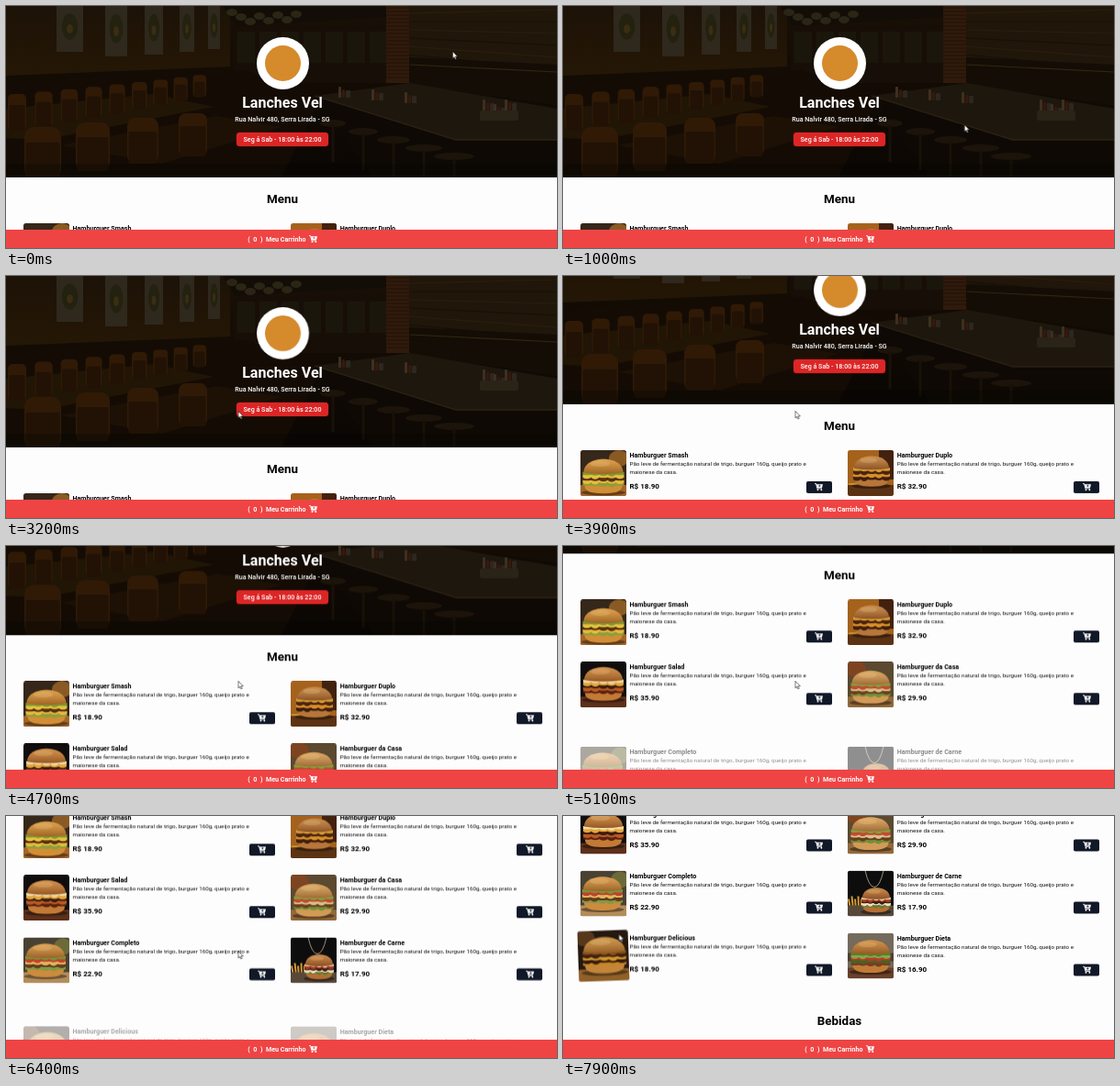
An HTML page for the animation above (8000 ms loop, 600 by 264 pixels).

```html
<!DOCTYPE html>
<html lang="pt-BR">
<head>
<meta charset="utf-8">
<title>Menu</title>
<style>
  * { margin: 0; box-sizing: border-box; }
  html, body { width: 100%; height: 100%; overflow: hidden; background: #fefdfe; }
  body { font-family: Roboto, sans-serif; font-size: 7.14px; line-height: 10.7px; color: #000; }
  #stage { position: relative; width: 600px; height: 264px; overflow: hidden; }
  #page, #logo, #cursor, .photo, .rise2, .rise3 { animation: 8s linear infinite; }
  #page { position: absolute; inset: 0; animation-name: scroll; }
  .mid { position: absolute; left: 0; width: 602px; text-align: center; }

  header { position: absolute; left: 0; top: 0; width: 600px; height: 187px; color: #fff; background: #0d0804; }
  header svg { position: absolute; left: 0; top: 0; }
  #logo { position: absolute; left: 272.7px; top: 33.5px; width: 57px; height: 57px; border-radius: 50%;
    background: #fff; animation-name: grow; }
  #logo::after { content: ""; position: absolute; inset: 9px; border-radius: 50%; background: #d58a2c; }
  h1 { top: 97.3px; font-size: 16.06px; line-height: 18px; }
  .address { top: 118.8px; font-weight: 500; }
  .hours { top: 138.3px; }
  .hours span { display: inline-block; height: 15.2px; padding: 0 7.1px; line-height: 15.2px;
    border-radius: 3.5px; background: #dc2626; box-shadow: 0 0 1.5px #a01616; font-weight: 500; }
  h2 { font-size: 13.4px; line-height: 16px; }

  .item { position: absolute; width: 274px; height: 50px; }
  .photo { position: absolute; left: 0; top: 0; width: 50px; height: 50px; border-radius: 2.7px; overflow: hidden; }
  .photo svg { display: block; width: 100%; height: 100%; }
  .item:nth-of-type(7) .photo { animation-name: tilt; }
  .info { position: absolute; left: 53.5px; top: .2px; width: 215px; }
  .info b { display: block; }
  .info p { width: 200px; font-size: 6.245px; line-height: 8.92px; color: #111; white-space: nowrap; }
  .price { position: absolute; left: 53.5px; top: 34.8px; font-size: 8.03px; font-weight: 700; }
  .add { position: absolute; left: 246px; top: 33.6px; width: 27.7px; height: 12.7px; border-radius: 1.8px;
    background: #111827; color: #fff; }
  .add svg { position: absolute; left: 9.4px; top: 2.2px; }
  .rise2 { animation-name: rise2; }
  .rise3 { animation-name: rise3; }

  footer { position: absolute; left: 0; top: 244px; width: 600px; height: 20px; background: #ef4444;
    color: #fff; font-weight: 700; white-space: pre; }
  footer > * { position: absolute; top: 6px; }
  #cursor { position: absolute; left: 0; top: 0; animation-name: point; }

  @keyframes scroll {
    0%, 44.4% { transform: translateY(0); }
    48.75% { transform: translateY(-47px); }
    52.5% { transform: translateY(-82px); }
    58.75% { transform: translateY(-89.5px); }
    61.25% { transform: translateY(-132px); }
    63.75% { transform: translateY(-178.7px); }
    68.75% { transform: translateY(-181px); }
    73.75% { transform: translateY(-195px); }
    78% { transform: translateY(-223px); }
    83% { transform: translateY(-267px); }
    88.1%, 100% { transform: translateY(-313.5px); }
  }
  @keyframes grow {
    0%, 22.4%, 30%, 100% { transform: scale(1); }
    25%, 27.5% { transform: scale(1.1); }
  }
  @keyframes tilt {
    0%, 90.6% { transform: none; animation-timing-function: ease; }
    94.4%, 100% { transform: scale(1.1) rotate(-2deg); }
  }
  @keyframes rise2 {
    0%, 62.4% { opacity: 0; transform: translateY(44.6px); animation-timing-function: ease; }
    67.4%, 100% { opacity: 1; transform: none; }
  }
  @keyframes rise3 {
    0%, 78.9% { opacity: 0; transform: translateY(44.6px); animation-timing-function: ease; }
    83.9%, 100% { opacity: 1; transform: none; }
  }
  @keyframes point {
    0% { transform: translate(486px, 49px); }
    5% { transform: translate(471px, 143px); }
    7.5%, 10% { transform: translate(470px, 143px); }
    21.25% { transform: translate(321px, 81px); }
    23.75% { transform: translate(315px, 74px); }
    26.25% { transform: translate(322px, 84px); }
    30.6% { transform: translate(420px, 144px); }
    32.5% { transform: translate(406px, 145px); }
    40%, 83.75% { transform: translate(252.5px, 147px); }
    88.75% { transform: translate(107px, 150px); }
    91.25% { transform: translate(66px, 160px); }
    95%, 98.6% { transform: translate(60px, 168px); }
    98.7%, 100% { transform: translate(60.5px, 128.5px); }
  }
</style>
</head>
<body>
<div id="stage">
  <main id="page">
    <header>
      <svg id="room" width="600" height="187"></svg>
      <div id="logo"></div>
      <h1 class="mid">Lanches Vel</h1>
      <p class="mid address">Rua Nalvir 480, Serra Lirada - SG</p>
      <p class="mid hours"><span>Seg á Sab - 18:00 às 22:00</span></p>
    </header>
    <h2 class="mid" style="top:203px">Menu</h2>
    <section id="items"></section>
    <h2 class="mid" style="top:528.5px">Bebidas</h2>
  </main>
  <footer><span style="left:263.3px">(  0  )</span><span style="left:283px">Meu Carrinho</span><span id="cart" style="left:330.4px"></span></footer>
  <svg id="cursor" width="8" height="11" viewBox="0 0 8 11">
    <path d="M.4 .4V7.9L2.1 6.4 3.3 9 4.5 8.5 3.4 5.9H5.8Z" fill="#fff" stroke="#111" stroke-width=".6"/>
  </svg>
</div>
<script>
const $ = id => document.getElementById(id);
const rect = (x, y, w, h, fill, r = 0) => `<rect x="${x}" y="${y}" width="${w}" height="${h}" rx="${r}" fill="${fill}"/>`;
const shape = (d, fill) => `<path d="${d}" fill="${fill}"/>`;
const line = (d, color, width = 1) => `<path d="${d}" fill="none" stroke="${color}" stroke-width="${width}"/>`;
const oval = (x, y, rx, ry, fill) => `<ellipse cx="${x}" cy="${y}" rx="${rx}" ry="${ry}" fill="${fill}"/>`;
const repeat = (n, f) => Array.from({ length: n }, (_, i) => f(i)).join("");
const fade = (id, a, b) => `<linearGradient id="${id}" x2="0" y2="1"><stop stop-color="${a}"/><stop offset="1" stop-color="${b}"/></linearGradient>`;

const cart = plus => `<svg width="9.2" height="8.4" viewBox="0 0 18 16" style="display:block">
  <path d="M0 1H3.1L5.6 11.2H15.6" fill="none" stroke="#fff" stroke-width="1.8"/>
  <path d="M3.6 2H17.6L15.8 9.4H5.4Z" fill="#fff"/>
  <circle cx="6.8" cy="14" r="1.8" fill="#fff"/><circle cx="14.4" cy="14" r="1.8" fill="#fff"/>
  <path d="M10.5 3.3V8M8.1 5.7H12.9" stroke="${plus}" stroke-width="1.4"/></svg>`;

// Dim dining room behind the header
function room() {
  const posters = [[55, 29, 50], [108, 24, 55], [151, 20, 53], [189, 16, 50], [220, 13, 47]];
  const chair = (x, y, w, h) => rect(x, y, w, h, "#301a06", w / 4) + rect(x + 1.5, y + h * .3, w - 3, h * .7, "#211205", 2);
  const bottle = (x, y) => rect(x, y, 3, 12, "#3c3022", 1) + rect(x + 4, y + 3, 3, 9, "#3a170b", 1) + rect(x + 8, y + 4, 5, 8, "#2c2720", 1);
  return `<defs>${fade("base", "#191006", "#0a0603")}${fade("wall", "#1c1207", "#251705")}${fade("crust", "rgba(255,220,150,.25)", "rgba(60,20,0,.35)")}</defs>` +
    rect(0, 0, 600, 188, "url(#base)") +
    shape("M0 0H244V66L0 76Z", "url(#wall)") +
    posters.map(([x, w, h]) => rect(x, -4, w, h + 4, "#2f281c") + oval(x + w / 2, h * .45, w * .3, h * .28, "#23210f") +
      oval(x + w / 2, h * .5, w * .12, h * .1, "#3b2d12")).join("") +
    shape("M236 0H416V12L250 22Z", "#130d07") +
    rect(248, 22, 168, 62, "#170f07") +
    repeat(7, i => rect(252 + i * 24, 28, 19, 34, "#1b160b")) +
    repeat(8, i => oval(246 + i * 10, 7 + i * 5 % 11, 6, 4, "#2b2516")) +
    shape("M438 0H600V108L438 84Z", "#20160a") +
    repeat(8, i => line(`M438 ${8 + i * 9}L600 ${4 + i * 13}`, i % 2 ? "#181006" : "#2a1e0e", 1.2)) +
    shape("M438 56L600 64V108L438 84Z", "#130d06") +
    rect(414, 0, 25, 84, "#301a0b") +
    repeat(20, i => line(`M414 ${i * 4 + 2}h25`, "#201008", 1)) +
    line("M440 64L600 72", "#33270f", 1.2) +
    shape("M0 84L260 70L345 96L300 187H0Z", "#140c04") +
    shape("M0 112L160 96L226 110L40 146L0 144Z", "#211505") +
    shape("M60 152L230 120L300 132L170 172Z", "#1d1105") +
    repeat(9, i => chair(2 + i * (30 - i * .6), 96 - i * 2.6, 20 - i * .7, 40 - i * 2)) +
    repeat(4, i => chair(20 + i * 56, 132 - i * 5, 40 - i * 3, 56 - i * 3)) +
    shape("M336 98L440 84L600 112V146L490 146Z", "#1e170d") +
    shape("M336 98L490 146L600 146V187H400Z", "#0e0904") +
    line("M336 98L490 146H600", "#2e2315", 1.3) +
    repeat(5, i => oval(356 + i * 33, 128 + i * 9, 14 + i * 2, 4, "#1c140a") +
      line(`M${356 + i * 33} ${130 + i * 9}v40`, "#191107", 3)) +
    repeat(3, i => bottle(362 + i * 36, 88 + i * 3)) +
    repeat(3, i => bottle(519 + i * 12, 102 + i % 2 * 5)) + rect(516, 114, 42, 11, "#2a2318", 2) +
    rect(0, 172, 600, 16, "rgba(0,0,0,.25)");
}

// [name, price, backdrop, board, bun, layers, x, y, width, extra behind]
const menu = [
  ["Smash", "18.90", "#35271a", "#a4652b", "#d28e36", ["#7c9a35", "#e6c23c", "#5a2d14", "#e8bd3a", "#8c9f3c"], 25, 9, 43, oval(42, 9, 11, 9, "#8a5a24")],
  ["Duplo", "32.90", "#a5621d", "#5b3314", "#b8763a", ["#d69a32", "#4a2411", "#d88f28", "#3d1d0e"], 26, 6, 38, rect(34, 0, 16, 32, "#42220e") + rect(0, 36, 15, 8, "#cf922d", 3)],
  ["Salad", "35.90", "#100d0c", "#5d301b", "#c47a36", ["#f0d9a4", "#e2a53a", "#3b1b10", "#b85a25", "#59230f"], 25, 5, 42, ""],
  ["da Casa", "29.90", "#5b4930", "#92693b", "#d29a56", ["#81a03c", "#c4492f", "#d8c08a", "#6b3c20", "#719137"], 25, 9, 41, oval(9, 8, 11, 9, "#7d4422")],
  ["Completo", "22.90", "#494233", "#b48c5a", "#cd8b3d", ["#71963a", "#c2412c", "#e0b75a", "#65381d", "#7f9a45"], 24, 6, 42, oval(43, 10, 10, 9, "#6c6a38")],
  ["de Carne", "17.90", "#0e0d0e", "#58483a", "#b66e34", ["#ddc9aa", "#a83822", "#3a1d12", "#eee0c0", "#647b30"], 31, 19, 30,
    line("M19 0Q23 18 29 18Q35 18 39 0", "#a99d86", .9) + repeat(5, i => line(`M${3 + i * 3} 42L${1 + i * 3.5} ${31 - i % 2 * 3}`, "#d39a34", 2))],
  ["Delicious", "18.90", "#25180f", "#916029", "#c38539", ["#8a4f1c", "#3f2011", "#d29a2c", "#371a0d", "#c98625"], 26, 6, 41, oval(7, 7, 10, 8, "#57371c")],
  ["Dieta", "16.90", "#756a5b", "#6a402a", "#c07c36", ["#597f2d", "#85a840", "#b53b2c", "#436521", "#7b3a25"], 25, 7, 41, rect(0, 22, 50, 9, "#4d4034")],
];

function photo([, , back, board, bun, layers, x, y, w, extra]) {
  const l = x - w / 2, r = x + w / 2, dome = w * .36, h = w * .34 / layers.length;
  const low = y + dome + h * layers.length;
  const top = `M${l} ${y + dome}C${l} ${y - 4} ${r} ${y - 4} ${r} ${y + dome}Q${x} ${y + dome + 3} ${l} ${y + dome}Z`;
  const strip = (color, i) => {
    const step = (w + 2) / 5;
    return shape(`M${l - 1} ${y + dome + i * h - .6}h${w + 2}v${h}` +
      repeat(5, k => `q${-step / 2} ${1 + (k * 3 + i * 2) % 4} ${-step} 0`) + "Z", color);
  };
  return `<svg viewBox="0 0 50 50">${rect(0, 0, 50, 50, back)}${extra}${rect(0, 38, 50, 12, board)}
    ${oval(x, low + w * .17, w * .56, 3, "rgba(0,0,0,.4)")}
    ${shape(`M${l + 1} ${low - 1}H${r - 1}Q${r} ${low + w * .2} ${x} ${low + w * .19}Q${l} ${low + w * .2} ${l + 1} ${low - 1}Z`, bun)}
    ${layers.map((_, i) => layers.length - 1 - i).map(i => strip(layers[i], i)).join("")}
    ${shape(top, bun)}${shape(top, "url(#crust)")}
    ${oval(x - w * .08, y + dome * .38, w * .25, dome * .2, "rgba(255,225,160,.2)")}</svg>`;
}

$("room").innerHTML = room();
$("cart").innerHTML = cart("#ef4444");
$("items").innerHTML = menu.map((m, i) => {
  const row = i >> 1;
  return `<div class="item rise${row}" style="left:${19 + i % 2 * 291.2}px;top:${237.4 + row * 68}px">
    <div class="photo">${photo(m)}</div>
    <div class="info"><b>Hamburguer ${m[0]}</b>
      <p>Pão leve de fermentação natural de trigo, burguer 160g, queijo prato e<br>maionese da casa.</p></div>
    <span class="price">R$ ${m[1]}</span><span class="add">${cart("#111827")}</span></div>`;
}).join("");
</script>
</body>
</html>
```
